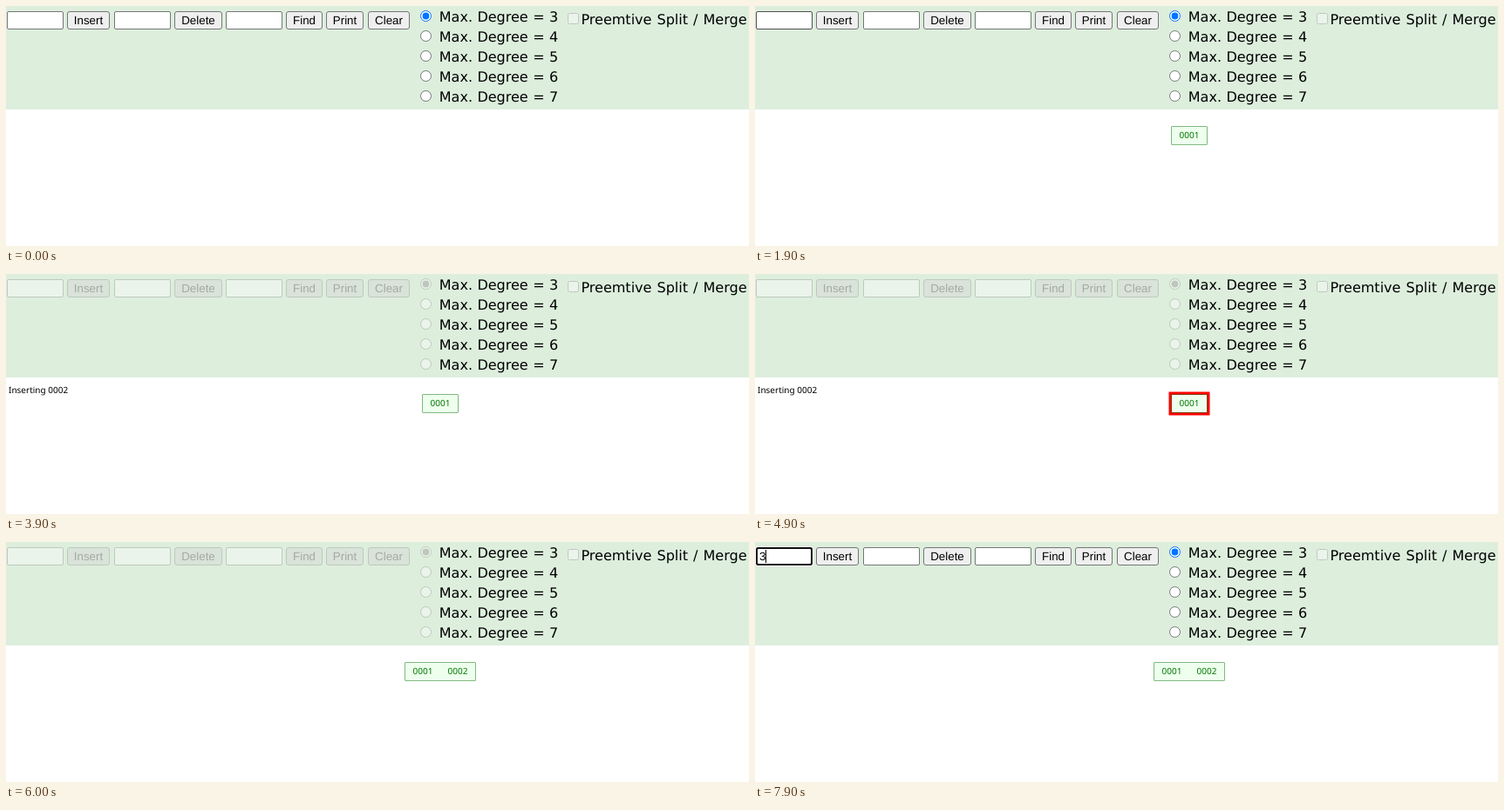
These frames come from a looping animation (852x276 px, 8000 ms). An HTML page:

```html
<!DOCTYPE html>
<html lang="en">
<head>
<meta charset="utf-8">
<title>B-tree insertion</title>
<style>
  html, body { margin: 0; width: 100%; height: 100%; overflow: hidden; background: #fff; }
  svg { display: block; width: 852px; height: 276px; }
  text { text-rendering: geometricPrecision; }
  .ui { font: 13.333px "Liberation Sans", Arial, sans-serif; }
  .label { font: 16px "DejaVu Sans", Verdana, sans-serif; word-spacing: .4px; }
  .small { font: 10px "Noto Sans", sans-serif; }
  .key { fill: #070; text-anchor: middle; }
</style>
</head>
<body>
<svg id="stage" viewBox="0 0 852 276"></svg>
<script>
const LOOP = 8000, TICK = 100;
const stage = document.getElementById('stage');

function add(tag, attrs, text) {
  const el = document.createElementNS('http://www.w3.org/2000/svg', tag);
  set(el, attrs);
  if (text) el.textContent = text;
  stage.appendChild(el);
  return el;
}
function set(el, attrs) {
  for (const k in attrs) el.setAttribute(k, attrs[k]);
}
const show = (el, on) => set(el, { visibility: on ? 'visible' : 'hidden' });

// One-pixel frame whose outer edge is x, y, w, h
const frame = (x, y, w, h, rx) =>
  add('rect', { x: x + .5, y: y + .5, width: w - 1, height: h - 1, rx });

add('rect', { width: 852, height: 119, fill: '#ded' });

const inputs = [1, 124, 252].map(x => frame(x, 6, 65, 21, 1.5));
const buttons = [['Insert', 70, 49], ['Delete', 193, 55], ['Find', 321, 42], ['Print', 367, 43], ['Clear', 415, 48]]
  .map(([name, x, w]) => ({
    box: frame(x, 6, w, 21, 2.5),
    text: add('text', { x: x + w / 2, y: 21, class: 'ui', 'text-anchor': 'middle' }, name)
  }));

const radios = [3, 4, 5, 6, 7].map((n, i) => {
  const y = 11.5 + 23 * i;
  add('text', { x: 496.8, y: y + 6.5, class: 'label' }, 'Max. Degree = ' + n);
  return add('circle', { cx: 481.5, cy: y, r: 6 });
});
const dot = add('circle', { cx: 481.5, cy: 11.5, r: 3.9 });

set(frame(644, 8, 13, 13, 2), { fill: '#ebf4eb', stroke: '#bec9be' });
add('text', { x: 659.5, y: 21, class: 'label', style: 'word-spacing:1px' }, 'Preemtive Split / Merge');

// Focus ring: dark inside, white halo outside
const halo = frame(0, 5, 67, 23, 3);
set(halo, { fill: 'none', stroke: '#fff' });
const ring = add('rect', { x: 2, y: 7, width: 63, height: 19, rx: 2, fill: '#fff', stroke: '#101010', 'stroke-width': 2 });
const typed = add('text', { x: 5, y: 21, class: 'ui' });
const caret = add('rect', { y: 9, width: 1, height: 15 });

const message = add('text', { x: 3, y: 137, class: 'small' });
const glow = add('rect', { fill: '#f00', stroke: '#f00' });
const node = add('rect', { y: 139, height: 20, fill: '#efe', stroke: '#070', 'paint-order': 'stroke' });
const keys = ['0001', '0002'].map(k => add('text', { y: 152, class: 'small key' }, k));

function drawControls(enabled, hover) {
  const edge = on => !enabled ? '#bec9be' : on ? '#4f4f4f' : '#767676';
  inputs.forEach((el, i) => set(el, { fill: enabled ? '#fff' : '#ebf4eb', stroke: edge(hover === 'input' + i) }));
  buttons.forEach(({ box, text }, i) => {
    const on = hover === 'button' + i;
    set(box, { fill: !enabled ? '#dae3da' : on ? '#e5e5e5' : '#efefef', stroke: edge(on) });
    set(text, { fill: enabled ? '#000' : '#a3aaa3' });
  });
  radios.forEach((el, i) => set(el, {
    fill: enabled ? '#fff' : '#ebf4eb',
    stroke: enabled && !i ? '#0075ff' : edge(false)
  }));
  set(dot, { fill: enabled ? '#0075ff' : '#bec6be' });
}

function drawField(focus, value, caretOn) {
  show(halo, focus);
  show(ring, focus);
  typed.textContent = value;
  set(caret, { x: value ? 12 : 5 });
  show(caret, focus && caretOn);
}

function drawTree(count, spread) {
  const half = 20 * count;
  show(node, count > 0);
  set(node, { x: 498 - half, width: 2 * half });
  keys.forEach((el, i) => {
    show(el, i < count);
    set(el, { x: 498 - half + 20 + 40 * i });
  });
  show(glow, spread > 0);
  set(glow, { x: 478 - spread, y: 139 - spread, width: 40 + 2 * spread, height: 20 + 2 * spread });
}

function render(time) {
  const t = Math.floor(time % LOOP / TICK) * TICK;
  const within = (a, b) => t >= a && t < b;

  const enabled = !within(800, 1900) && !within(3900, 7100);
  const hover = within(100, 200) ? 'input1' : within(200, 300) ? 'button0' : t >= 300 ? 'input0' : '';
  drawControls(enabled, hover);

  const focus = within(500, 800) || within(3100, 3900) || t >= 7100;
  const value = within(600, 800) ? '1' : within(3500, 3900) ? '2' : t >= 7900 ? '3' : '';
  drawField(focus, value, !within(7500, 7900));

  message.textContent = within(800, 1800) ? 'Inserting 0001' : within(3900, 5800) ? 'Inserting 0002' : '';

  // The highlight pulses between 3 and 7 px
  const pulse = 7 - Math.abs((t - 4900) / 210 - 4);
  drawTree(t >= 5800 ? 2 : t >= 1800 ? 1 : 0, within(4900, 5800) ? pulse : 0);
}

const start = performance.now();
function loop() {
  render(performance.now() - start);
  requestAnimationFrame(loop);
}
render(0);
requestAnimationFrame(loop);
</script>
</body>
</html>
```
